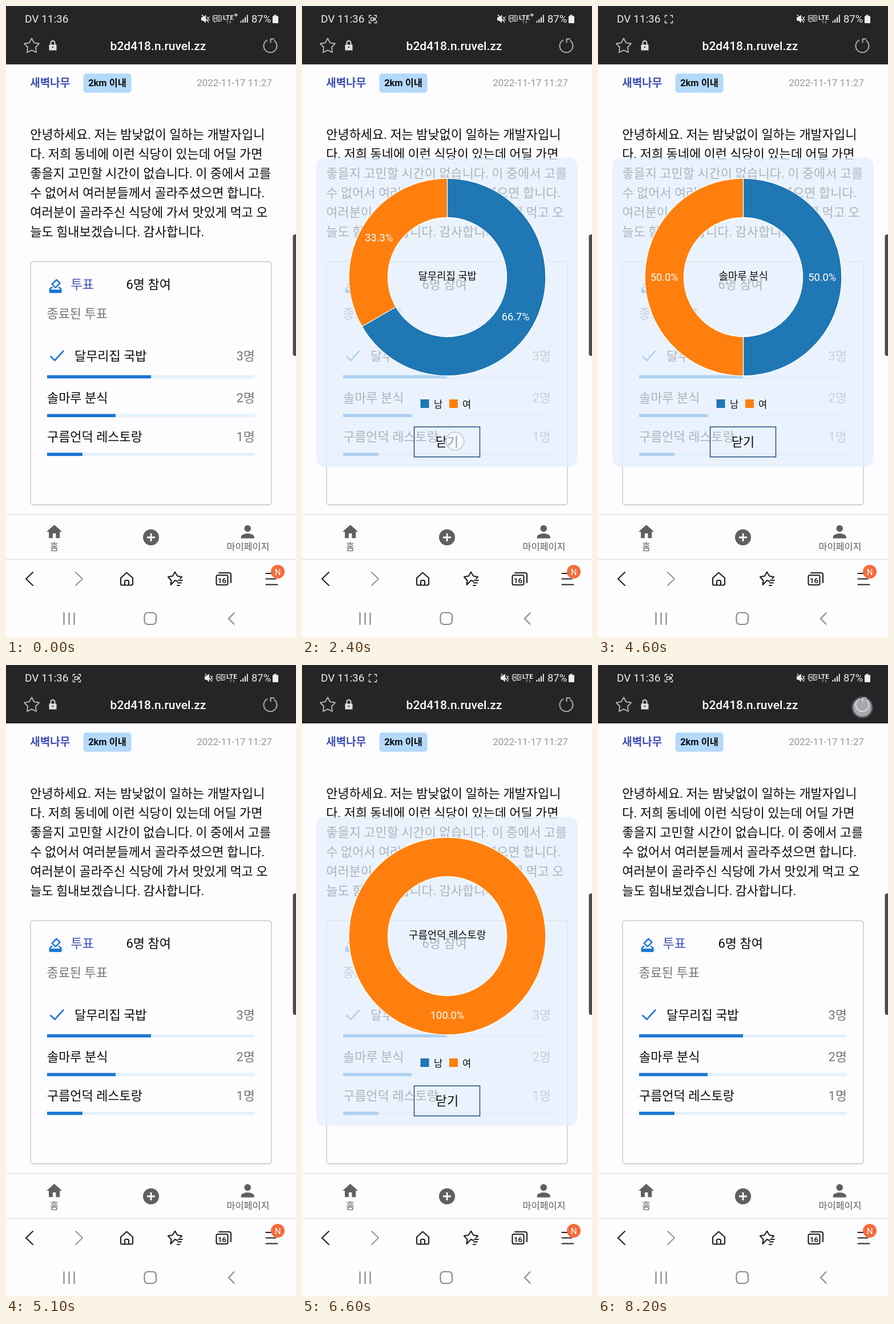
An HTML page for the animation above (8300 ms loop, 508x1102 px).

```html
<!DOCTYPE html>
<html lang="ko">
<head>
<meta charset="utf-8">
<title>투표 결과</title>
<style>
  html, body { margin: 0; width: 100%; height: 100%; overflow: hidden; background: #fdfcff; }
  svg { display: block; width: 100vw; height: 100vh; }
  text { font-family: Roboto, "Noto Sans CJK KR", "Noto Sans CJK", sans-serif; font-size: 21.95px; fill: #09090a; white-space: pre; }
  .gray { fill: #77777a; }
  .mid { text-anchor: middle; }
  .end { text-anchor: end; }
  .line { fill: none; stroke-linecap: round; stroke-linejoin: round; }
  .dark { stroke: #202022; stroke-width: 2.1; }
  .soft { stroke: #8b8b8e; stroke-width: 2.2; }
  .pale { stroke: #b5b4b8; stroke-width: 1.9; }
  .light { stroke: #eee; stroke-width: 1.3; }
  .tab { font-size: 16.3px; fill: #5f5f62; }
  .status { font-size: 19px; fill: #ededee; }
  .share { font-size: 18.3px; fill: #fff; }
  .legend { font-size: 16.5px; }
</style>
</head>
<body>
<svg viewBox="0 0 508 1102" preserveAspectRatio="none">
  <rect width="508" height="1102" fill="#fdfcff"/>

  <!-- Status bar and address bar -->
  <rect width="508" height="102" fill="#252427"/>
  <text class="status" x="33" y="29">DV 11:36</text>
  <g id="recorder" class="line light">
    <path d="M117.5 20v-3.5h3.5M127 16.5h3.5v3.5M130.5 26v3.5h-3.5M121 29.5h-3.5v-3.5"/>
    <path id="camera" d="M120.5 20.5h5v5h-5zM126 23l2.5-2v4z"/>
  </g>
  <g id="network">
    <path d="M342 19.5h3l5-4v14l-5-4h-3z" fill="#ededee"/>
    <path class="line light" d="M343 15.5l12 13M352 19l4 6M356 19l-4 6"/>
    <path class="line light" style="stroke-width:1" d="M364 16.5h12q1.500 0 1.500 1.500v7q0 1.500-1.500 1.500h-8l-3 2v-2h-1q-1.500 0-1.500-1.500v-7q0-1.500 1.500-1.500z"/>
    <text class="mid" x="370" y="25" style="font-size:9px;font-weight:500;fill:#eee">HD</text>
    <text x="380" y="23.5" style="font-size:11.5px;font-weight:700;fill:#eee">LTE</text>
    <path class="line" stroke="#8f8f92" stroke-width="1.2" d="M388 30v-5l-1.500 2M392.500 25v5l1.500-2"/>
  </g>
  <path id="plus" class="line light" d="M400 15.5h5.500M402.700 12.800v5.500"/>
  <path d="M410.500 26h2v3h-2zM414.200 23h2v6h-2zM418 19.500h2v9.500h-2zM421.700 15.500h2v13.500h-2z" fill="#ededee"/>
  <text class="status" x="430" y="29" style="font-size:18.4px">87%</text>
  <path d="M469.500 15.500h4v2h3.500v12.500h-10v-12.500h2.500z" fill="#ededee"/>
  <path id="star" class="line pale"/>
  <path class="line" stroke="#e0e0e2" stroke-width="1.9" d="M78.500 68v-3.500a3.500 3.500 0 0 1 7 0v3.500"/>
  <path d="M75.500 67.500h13v10h-13z" fill="#e0e0e2"/>
  <circle cx="82" cy="72" r="1.3" fill="#252427"/>
  <text class="mid" x="266.5" y="77" style="font-size:21px;font-weight:500;fill:#fff">b2d418.n.ruvel.zz</text>
  <path class="line pale" d="M457.500 59.500a11.500 11.500 0 1 0 12.500 1M463.500 63.500v-6h6"/>

  <!-- Post -->
  <text x="42.3" y="141" style="font-size:19px;font-weight:700;fill:#3f51b5">새벽나무</text>
  <rect x="135.5" y="118" width="84" height="33.5" rx="5" fill="#b3d9fb"/>
  <text class="mid" x="177.5" y="140" style="font-size:16.4px;font-weight:700">2km 이내</text>
  <text class="end" x="465.7" y="140" style="font-size:16.9px;fill:#97979a">2022-11-17 11:27</text>
  <g id="post"></g>

  <!-- Poll -->
  <rect x="43" y="446.5" width="422" height="424.7" rx="5" fill="none" stroke="#c5c4c7" stroke-width="1.4"/>
  <path transform="translate(72 474.5) scale(1.22)" fill="#1976d2" d="M18 13h-.68l-2 2h1.910L19 17H5l1.780-2h2.050l-2-2H6l-3 3v4c0 1.100.890 2 1.990 2H19c1.100 0 2-.890 2-2v-4l-3-3zm-1-5.050l-4.950 4.950-3.540-3.540 4.950-4.950L17 7.950zm-4.240-5.660L6.390 8.660c-.390.390-.390 1.020 0 1.410l4.950 4.950c.390.390 1.020.390 1.410 0l6.360-6.360c.390-.390.390-1.020 0-1.410L14.160 2.300c-.380-.400-1.010-.400-1.400-.010z"/>
  <text x="113.5" y="494" style="fill:#3f51b5">투표</text>
  <text x="210.5" y="494">6명 참여</text>
  <text class="gray" x="71.5" y="545">종료된 투표</text>
  <path d="M77.500 611.500l8 7.500 15.500-17" fill="none" stroke="#1976d2" stroke-width="2.6"/>
  <g id="choices"></g>
  <path d="M508 399h-1.500q-4 0-4 4v204q0 4 4 4h1.500z" fill="#4b4a4e"/>

  <!-- App tabs -->
  <path d="M0 887.700h508M0 966.500h508" stroke="#e0dfe2" stroke-width="1.4"/>
  <g fill="#5f5f62">
    <path transform="translate(68.3 902) scale(1.36)" d="M10 20v-6h4v6h5v-8h3L12 3 2 12h3v8z"/>
    <circle cx="254" cy="928" r="14"/>
    <path transform="translate(406 901) scale(1.44)" d="M12 12c2.210 0 4-1.790 4-4s-1.790-4-4-4-4 1.790-4 4 1.790 4 4 4zm0 2c-2.670 0-8 1.340-8 4v2h16v-2c0-2.660-5.330-4-8-4z"/>
  </g>
  <path d="M247 928h14M254 921v14" stroke="#fff" stroke-width="2.8"/>
  <text class="tab mid" x="84.5" y="950">홈</text>
  <text class="tab mid" x="424" y="950">마이페이지</text>

  <!-- Browser and system buttons -->
  <g class="line dark">
    <path d="M47 989l-12 11.500 12 11.500"/>
    <path d="M122 989l12 11.500-12 11.500" stroke="#98989b"/>
    <path d="M201 999l10.500-9.500 10.500 9.500v10q0 2.500-2.500 2.500h-16q-2.500 0-2.500-2.500zM208 1011v-6q0-2 2-2h3q2 0 2 2v6"/>
    <path d="M300.500 1005l-4.500-2-7.500 8 1-8-5.500-6 8-1.500 4-7 4 7 8 1.500-3 3M302 1003h7M301 1007.500h6M300 1012h4"/>
    <path d="M371 994h15q2.500 0 2.500 2.500v12q0 2.500-2.500 2.500h-15q-2.500 0-2.500-2.500v-12q0-2.500 2.500-2.500zM373 990h18q3 0 3 3v14"/>
    <path d="M455.500 991h12M455.500 1000.500h17M455.500 1010.500h20"/>
  </g>
  <text class="mid" x="378.5" y="1007.5" style="font-size:13px;font-weight:500">16</text>
  <circle cx="476" cy="988" r="12" fill="#f66c3c"/>
  <text class="mid" x="476" y="993.5" style="font-size:15px;fill:#fff">N</text>
  <g class="line soft">
    <path d="M101.500 1060v20M110.500 1060v20M119.500 1060v20M399.500 1060l-9.500 9.700 9.500 9.700"/>
    <rect x="242.5" y="1059.5" width="20.5" height="20.5" rx="6"/>
  </g>

  <!-- Result panel -->
  <g id="panel">
    <rect x="25" y="265" width="457.5" height="540" rx="14" fill="#e4f1fc" fill-opacity=".74"/>
    <g fill="none" stroke-width="68.5" transform="rotate(-90 254.5 473.5)">
      <circle id="women" cx="254.5" cy="473.5" r="138.25" pathLength="100" stroke="#ff7f0e"/>
      <circle id="men" cx="254.5" cy="473.5" r="138.25" pathLength="100" stroke="#1f77b4"/>
    </g>
    <g fill="none" stroke="#fff" stroke-width="1.4">
      <circle cx="254.5" cy="473.5" r="172.5"/>
      <circle cx="254.5" cy="473.5" r="104"/>
      <path id="seams"/>
    </g>
    <text class="share mid" id="menShare"></text>
    <text class="share mid" id="womenShare"></text>
    <text class="mid" id="title" x="254.7" y="478" style="font-size:17.8px"></text>
    <rect x="207.5" y="687" width="15" height="15" fill="#1f77b4"/>
    <text class="legend" x="231" y="701.5">남</text>
    <rect x="258" y="687" width="15" height="15" fill="#ff7f0e"/>
    <text class="legend" x="281" y="701.5">여</text>
    <rect x="196.5" y="735" width="115" height="52.5" fill="none" stroke="#21497f" stroke-width="1.5"/>
    <text class="mid" x="254" y="769">닫기</text>
  </g>

  <g id="touch">
    <circle r="19" fill="#fff" fill-opacity=".2"/>
    <circle r="15.8" fill="#fafaff" fill-opacity=".52" stroke="#a4a4b8" stroke-opacity=".55" stroke-width="1.8"/>
  </g>
</svg>
<script>
const LOOP = 8300, STEP = 100, SWEEP = 300;
const CX = 254.5, CY = 473.5, INNER = 104, OUTER = 172.5;
const ROW = 67.7;
const $ = id => document.getElementById(id);

const post = [
  '안녕하세요. 저는 밤낮없이 일하는 개발자입니',
  '다. 저희 동네에 이런 식당이 있는데 어딜 가면',
  '좋을지 고민할 시간이 없습니다. 이 중에서 고를',
  '수 없어서 여러분들께서 골라주셨으면 합니다.',
  '여러분이 골라주신 식당에 가서 맛있게 먹고 오',
  '늘도 힘내보겠습니다. 감사합니다.'
];
const choices = [
  { name: '달무리집 국밥', votes: 3, x: 120, y: 618.5, fill: 182, men: 2 / 3, open: 1100, close: 2600 },
  { name: '솔마루 분식', votes: 2, x: 72, y: 692, fill: 120, men: 0.5, open: 3500, close: 5100 },
  { name: '구름언덕 레스토랑', votes: 1, x: 72, y: 760, fill: 62, men: 0, open: 6100, close: 7800 }
];
const taps = [
  { from: 900, to: 1100, x: 180, y: 612 },
  { from: 2200, to: 2600, x: 268, y: 760 },
  { from: 3200, to: 3500, x: 166, y: 681 },
  { from: 4900, to: 5100, x: 268, y: 760 },
  { from: 5900, to: 6100, x: 211, y: 760 },
  { from: 7700, to: 7900, x: 268, y: 760 },
  { from: 8100, to: 8300, x: 463, y: 74 }
];

const bar = (row, width, color) =>
  `<rect x="72" y="${644.8 + row * ROW}" width="${width}" height="5.6" fill="${color}"/>`;

$('post').innerHTML = post.map((line, i) => `<text x="42.3" y="${232 + i * 34}">${line}</text>`).join('');
$('choices').innerHTML = choices.map((c, i) => `
  <text x="${c.x}" y="${c.y}">${c.name}</text>
  <text class="gray end" x="436" y="${c.y}">${c.votes}명</text>
  ${bar(i, 364, '#e4f1fc')}${bar(i, c.fill, '#1976d2')}`).join('');

// Point on a clockwise turn that starts at the top.
const polar = (cx, cy, r, turn) => {
  const a = turn * 2 * Math.PI;
  return [cx + r * Math.sin(a), cy - r * Math.cos(a)];
};
const starPoints = Array.from({ length: 10 }, (_, i) => polar(45, 70, i % 2 ? 7.2 : 13.6, i / 10));
$('star').setAttribute('d', `M${starPoints.join('L')}Z`);

const show = (el, on) => { el.style.display = on ? '' : 'none'; };
const ease = p => p < 0.5 ? 4 * p ** 3 : 1 - 4 * (1 - p) ** 3;

function drawShare(el, share, turn, opacity) {
  const [x, y] = polar(CX, CY, (INNER + OUTER) / 2, turn);
  show(el, share > 0);
  el.setAttribute('x', x);
  el.setAttribute('y', y + 6.5);
  el.setAttribute('opacity', opacity);
  el.textContent = (share * 100).toFixed(1) + '%';
}

function drawPanel(choice, t) {
  const p = ease(Math.min(1, (t - choice.open) / SWEEP));
  const { men } = choice;
  const seam = turn => `M${polar(CX, CY, INNER, turn)}L${polar(CX, CY, OUTER, turn)}`;
  show($('men'), men * p > 0);
  show($('women'), p > 0);
  $('men').setAttribute('stroke-dasharray', `${men * p * 100} 200`);
  $('women').setAttribute('stroke-dasharray', p < 1 ? `${p * 100} 200` : 'none');
  $('seams').setAttribute('d', men ? seam(0) + seam(men * p) : '');
  drawShare($('menShare'), men, men / 2, p);
  drawShare($('womenShare'), 1 - men, (1 + men) / 2, p);
  $('title').textContent = choice.name;
}

function draw(t) {
  const choice = choices.find(c => t >= c.open && t < c.close);
  const tap = taps.find(a => t >= a.from && t < a.to);
  const early = t < 4100;

  show($('recorder'), t >= 100);
  show($('camera'), Math.floor((t - 100) / 500) % 2 === 0);
  show($('plus'), early);
  $('network').setAttribute('transform', `translate(${early ? 0 : 6} 0)`);

  show($('panel'), choice);
  if (choice) drawPanel(choice, t);
  show($('touch'), tap);
  if (tap) $('touch').setAttribute('transform', `translate(${tap.x} ${tap.y})`);
}

const start = performance.now();
function tick() {
  const t = (performance.now() - start) % LOOP;
  draw(Math.floor(t / STEP) * STEP);
  requestAnimationFrame(tick);
}
tick();
</script>
</body>
</html>
```
